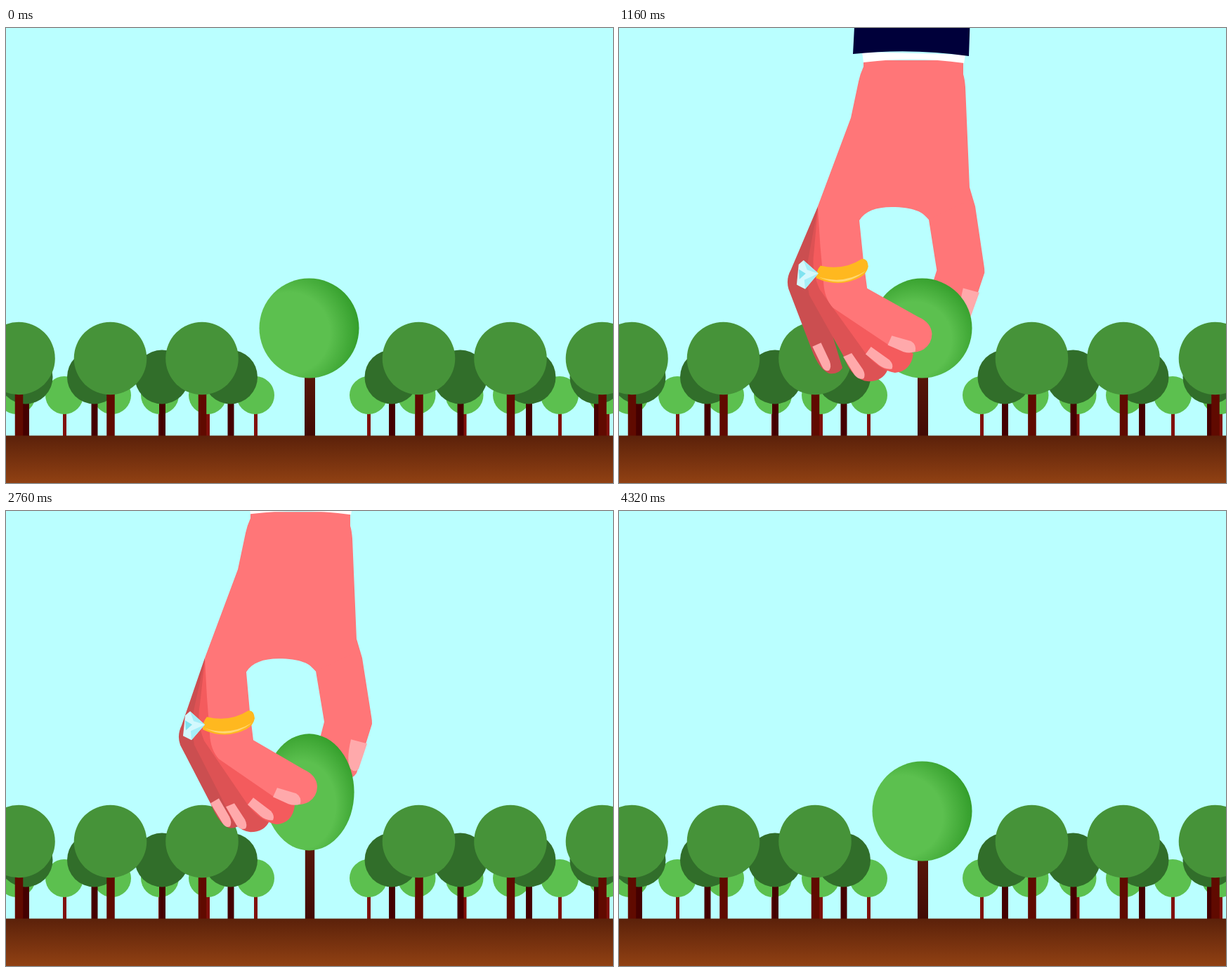
An HTML page for the animation above (4720 ms loop, 864x648 px).

```html
<!DOCTYPE html>
<html lang="en">
<head>
<meta charset="utf-8">
<title>Tree picking</title>
<style>
html, body { margin: 0; width: 100%; height: 100%; overflow: hidden; background: #baffff; }
svg { display: block; }
</style>
</head>
<body>
<svg width="864" height="648" viewBox="0 0 864 648">
  <defs>
    <radialGradient id="leafy">
      <stop offset=".55" stop-color="#5cc04f"/>
      <stop offset="1" stop-color="#2f9a27"/>
    </radialGradient>
    <linearGradient id="soil" x2="0" y2="1">
      <stop stop-color="#5b210a"/>
      <stop offset="1" stop-color="#914113"/>
    </linearGradient>
    <linearGradient id="bark" x2="0" y2="1">
      <stop offset=".4" stop-color="#581609"/>
      <stop offset="1" stop-color="#3e0903"/>
    </linearGradient>
  </defs>
  <g id="forest"></g>
  <g id="back"></g>
  <rect y="580.5" width="864" height="68" fill="url(#soil)"/>
  <g id="front"></g>
</svg>
<script>
const LOOP = 4720, STEP = 40;
const $ = id => document.getElementById(id);
const clamp = u => Math.min(1, Math.max(0, u));
const smooth = u => (u = clamp(u), u * u * (3 - 2 * u));
const path = (d, fill) => `<path d="${d}" fill="${fill}"/>`;
const group = (transform, body) => `<g transform="${transform}">${body}</g>`;

// Blends two paths that share the same commands.
function morph(a, b, k) {
  const target = b.match(/[\d.]+/g);
  let i = 0;
  return a.replace(/[\d.]+/g, v => (+v + (target[i++] - v) * k).toFixed(2));
}

function row(xs, r, cy, leaf, trunkWidth, trunk) {
  return xs.map(x =>
    `<rect x="${x + .5 - trunkWidth / 2}" y="${cy}" width="${trunkWidth}" height="${581 - cy}" fill="${trunk}"/>
     <circle cx="${x}" cy="${cy}" r="${r}" fill="${leaf}"/>`).join('');
}
$('forest').innerHTML =
  row([15, 83, 151, 219, 287, 355, 516, 584.5, 652.5, 720, 788, 856], 27, 523, '#5cc04f', 5, '#80100a') +
  row([28, 125.5, 222, 319.5, 549, 646.5, 744, 841], 38.5, 497, '#316e2a', 9, '#450000') +
  row([18, 148.5, 279, 587.5, 718, 848.5], 51.8, 470.5, '#469339', 11.5, '#600a00');

const SKIN = '#ff7678', NAIL = '#ffa9ab';
// Each part: fill, open pose, closed pose.
const thumb = [
  [SKIN,
    'M430 262L443 277L473 347L490 407Q498 430 523 430Q556 428 557 400L540 334Q539 328 537 324L506 252L498 226L470 210Z',
    'M430 262L441 273L453 345L447 368Q447 410 470 425Q490 432 499 418L521 348Q521 342 520 337L507 254L499 227L470 210Z'],
  [NAIL,
    'M524 358L544 352L556 396Q556 402 548 400Q530 395 524 358Z',
    'M491 370L514 376L502 412Q497 418 490 412Q484 400 491 370Z']
];
const pinky = [
  ['#cb4e50',
    'M287 246L207 303Q196 311 194 327L153 433Q151 456 170 463Q182 465 190 455L225 361L290 290Z',
    'M283 254L250 350Q243 364 248 378L291 461Q303 490 317 496Q330 498 336 488L300 400L290 290Z'],
  [NAIL,
    'M163 402L177 407L169 433Q165 440 158 441Q151 441 153 432Z',
    'M291 461L303 454L318 480Q322 488 319 494Q313 497 308 489Z']
];
const fourth = [
  ['#dd5254',
    'M287 247L228 303Q214 318 211 335L173 447Q172 466 193 475Q210 478 216 465L235 361L290 300Z',
    'M283 256L268 325Q262 350 268 378L313 466Q325 500 348 502Q368 502 375 486L330 420L290 300Z'],
  [NAIL,
    'M179 416L193 420L188 442Q185 453 179 456Q172 456 174 446Z',
    'M313 466L325 461L340 484Q344 492 341 497Q334 500 328 492Z']
];
const middle = [
  ['#f45b5d',
    'M287 250L250 295Q218 345 213 370L204 460Q204 488 228 492Q252 492 254 470L261 378L295 300Z',
    'M283 258L276 320Q271 345 282 372L344 463Q362 487 385 491Q408 489 411 464L345 410L295 300Z'],
  [NAIL,
    'M205 435L218 435L217 457Q215 470 208 476Q202 473 204 457Z',
    'M344 463L352 453L377 472Q383 479 380 485Q370 486 362 479Z']
];
const palm = [
  [SKIN,
    'M348 46L348 55Q343 66 341 76L330 128L287 248L273 305L260 373Q259 385 265 394L302 457L316 483Q330 499 351 498Q375 495 374 470Q373 462 367 454L318 381L326 341L340 277C350 262 366 256 388 256C418 256 436 262 443 277L500 240L498 226L493 84Q492 72 490 66L490 46Z',
    'M348 46L348 55Q343 66 341 76L330 128L283 254L286 310L290 362Q291 385 303 398L380 451L402 461Q418 466 431 459Q443 451 443 437Q442 421 424 413L352 371L347 330L342 274C350 261 366 255 388 255C418 255 434 262 441 273L500 245L499 228L493 84Q492 72 490 66L490 46Z'],
  [NAIL,
    'M309 464L322 457L337 474Q342 485 340 495Q330 495 318 484Z',
    'M380 452L386 439L413 447Q421 452 419 462Q411 465 402 462Z'],
  ['#ffb81f',
    'M264 327Q292 343 322 336Q330 336 331 345Q329 358 318 360Q285 370 257 346Q256 335 264 327Z',
    'M286 338Q318 346 345 329Q353 328 354 340Q352 350 343 355Q312 371 280 356Q279 346 286 338Z'],
  ['#ffd873',
    'M259 345Q295 363 329 351Q295 369 259 345Z',
    'M283 354Q318 366 351 346Q318 372 283 354Z'],
  ['#d3f8fd',
    'M234 316L245 312L260 337L237 352L226 348Z',
    'M255 336L262 330L283 349L264 371L252 365Z'],
  ['#7fe3f0',
    'M231 327L242 328L233 339Z',
    'M255 343L265 349L256 357Z'],
  ['#a5eef8',
    'M237 352L240 340L260 337Z',
    'M264 371L263 358L283 349Z'],
  ['#a5eef8',
    'M245 312L246 328L260 337Z',
    'M262 330L267 344L283 349Z']
];
const CUFF = path('M346 34L348 49Q420 40 491 50L493 38Z', '#fff') +
  path('M336 -20L333 37Q415 28 498 40L500 -20Z', '#00003a');

const draw = (parts, k) => parts.map(([fill, a, b]) => path(morph(a, b, k), fill)).join('');

// Finger closing, with a slight overshoot at the end.
function grip(t, start) {
  const u = (t - start) / 320;
  return smooth(u) + .05 * Math.sin(Math.PI * clamp(2 * u - 2));
}

function handY(t) {
  if (t < 880) return -520 * (1 - clamp((t - 220) / 660)) ** 1.52;
  const pull = -73 * smooth((t - 2380) / 660);
  return t < 3040 ? pull : pull - 169 * ((t - 3040) / 200) ** 1.7;
}

function tree(y, stretch, transform) {
  const rx = 71 - .155 * stretch, ry = 71 + .27 * stretch;
  const cy = 427.5 + y + 1.8 * stretch ** .6;
  const base = 593 + y + stretch, w = 15 - .035 * stretch;
  const roots = 'M425 -6Q424 8 409 14Q422 12 429 4Q430 12 421 18Q434 14 434 3Q455 0 464 14Q458 -2 440 -4Z';
  return group(transform,
    `<rect x="${432.5 - w / 2}" y="${cy}" width="${w}" height="${base - cy}" fill="url(#bark)"/>` +
    group(`translate(0 ${base})`, path(roots, '#3e0903')) +
    `<ellipse cx="431.5" cy="${cy}" rx="${rx}" ry="${ry}" fill="url(#leafy)"/>`);
}

// Tip position, angle and velocity at 3240 ms.
const LEAVES = [[417, 390, 133, -1.35, .35], [401, 400, 140, -1, .45], [460, 389, 8, 1.3, .2]];
function leaves(t) {
  if (t < 3220 || t > 3550) return '';
  const d = t - 3240;
  return LEAVES.map(([x, y, angle, vx, vy]) =>
    group(`translate(${x + vx * d} ${y + vy * d}) rotate(${angle})`,
      path('M0 0Q14 -8 23 -6Q32 0 26 6Q16 9 0 0Z', '#5cc04f'))).join('');
}

function render(t) {
  const y = handY(t);
  const index = grip(t, 720);
  const sway = t > 1352 && t < 2312 ? -2.1 * Math.sin((t - 1352) / 480 * 2 * Math.PI) : 0;
  const hand = `translate(0 ${y}) rotate(${sway} 420 49)`;
  const showHand = t >= 240 && t < 3560;

  let plant;
  if (t < 3560) {
    const held = t >= 2380;
    const stretch = t < 3040 ? (held ? -y : 0) : 73 * Math.exp((3040 - t) / 126);
    plant = tree(held ? y : 0, stretch, `rotate(${-.62 * sway} 432 580)`);
  } else {
    const u = clamp((t - 3880) / 440), grow = u * (2 - u);
    plant = grow ? tree(0, 0, `translate(432 580) scale(${grow}) translate(-432 -580)`) : '';
  }

  const shade = t < 3560 ? clamp(index) : 0;
  const light = $('leafy');
  light.setAttribute('cx', .3 + .12 * shade);
  light.setAttribute('fx', .3 + .12 * shade);
  light.setAttribute('cy', .55 + .06 * shade);
  light.setAttribute('fy', .55 + .06 * shade);
  light.setAttribute('r', .74 - .06 * shade);

  $('back').innerHTML = (showHand ? group(hand, draw(thumb, index)) : '') + plant;
  $('front').innerHTML = leaves(t) + (showHand
    ? group(hand, draw(pinky, grip(t, 910)) + draw(fourth, grip(t, 780)) +
        draw(middle, grip(t, 760)) + draw(palm, index)) +
      group(`translate(0 ${y})`, CUFF)
    : '');
}

function tick() {
  render(Math.floor(performance.now() % LOOP / STEP) * STEP);
  requestAnimationFrame(tick);
}
tick();
</script>
</body>
</html>
```
